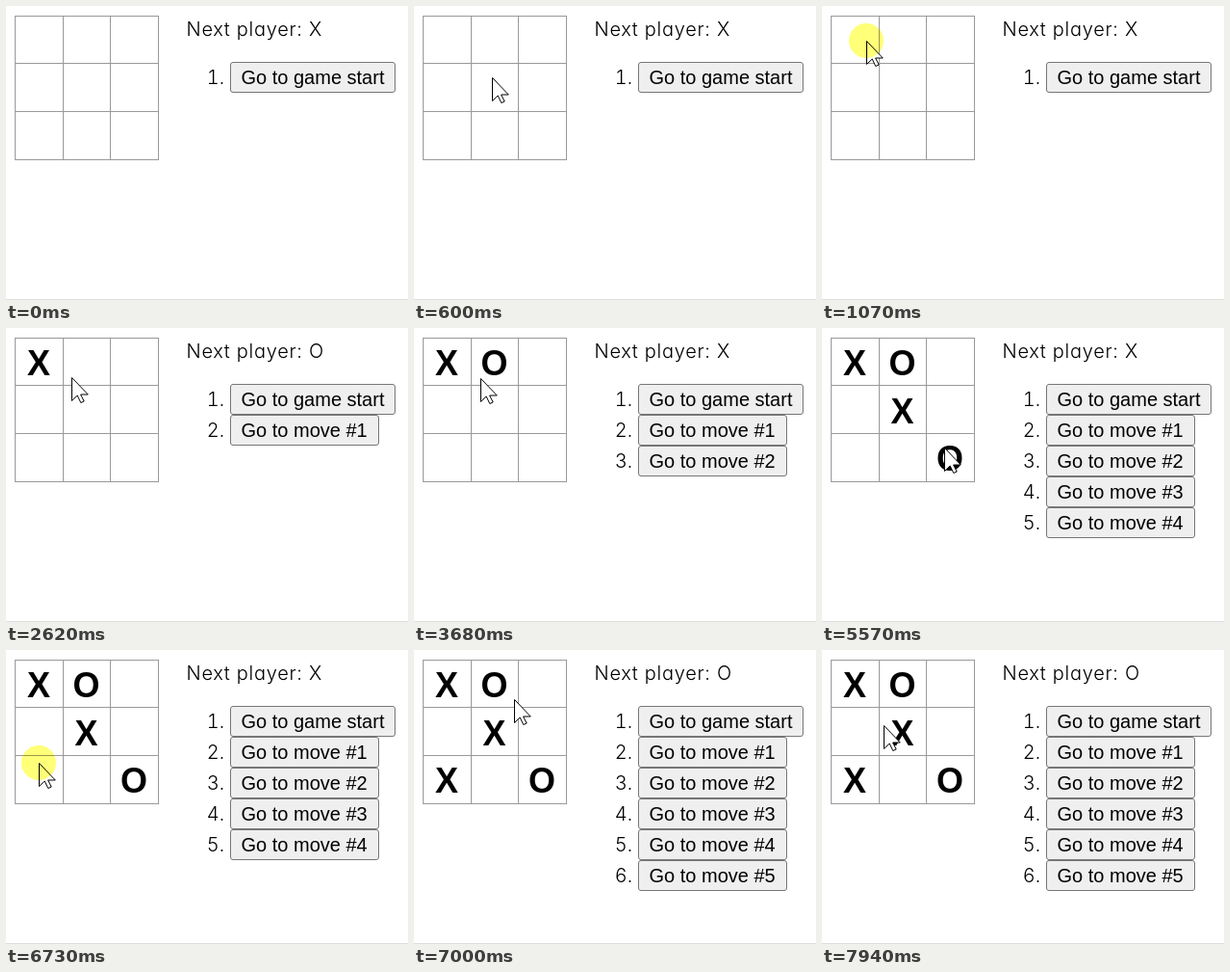
Write an HTML page that moves like this. It is 418x305 px and loops after 8000 ms.

```html
<!DOCTYPE html>
<html lang="en">
<head>
<meta charset="utf-8">
<title>Tic-tac-toe</title>
<style>
html, body { margin: 0; width: 100%; height: 100%; overflow: hidden; background: #fff; }
svg { display: block; width: 418px; height: 305px; }
.label { font: 300 20px Inter, sans-serif; font-feature-settings: "cv11"; letter-spacing: .7px; }
.number { font-feature-settings: "tnum"; letter-spacing: 0; text-anchor: end; }
.button { font: 20px "Liberation Sans", Arial, sans-serif; }
.mark { font: bold 36px "Liberation Sans", Arial, sans-serif; text-anchor: middle; }
#glow { mix-blend-mode: multiply; }
</style>
</head>
<body>
<svg viewBox="0 0 418 305">
  <path d="M0 304.5H418" stroke="#ddd"/>
  <path d="M9 10.5H159M9 59.5H159M9 109.5H159M9 159.5H159M9.5 10V160M59.5 10V160M108.5 10V160M158.5 10V160" stroke="#999" fill="none"/>
  <text id="status" class="label" x="187.5" y="31"></text>
  <g id="list"></g>
  <g id="marks"></g>
  <path id="cursor" d="M.5 .5V24.5L6.2 19L9.8 26.5L13.2 25L9.6 18H17.3Z" fill="#fff" stroke="#000"/>
  <circle id="glow" r="18" fill="#ffff78"/>
</svg>
<script>
const LOOP = 8000, STEP = 70, ENTER = 190, CELL = 49.5;
const NS = "http://www.w3.org/2000/svg";
const $ = id => document.getElementById(id);

// Times at which a mark is placed; the pointer decides the cell
const played = [1140, 2950, 4090, 5570, 6800];

// Pointer stops: departure time, x, y, number of steps
const entry = [324, 339];
const stops = [
  [ENTER, 46, 36, 12],
  [1340, 64, 51],
  [2620, 68, 51],
  [3680, 69, 52],
  [3750, 78, 80, 4],
  [5010, 109, 89],
  [5080, 127, 124, 6],
  [6310, 34, 117, 6],
  [6870, 107, 48, 3],
  [7730, 64, 78, 4]
];

const easeOut = p => 1 - (1 - p) ** 3;

function pointer(t) {
  let [x, y] = entry;
  for (const [start, endX, endY, steps = 1] of stops) {
    if (t < start) break;
    const done = Math.floor((t - start) / STEP) + 1;
    const p = easeOut(Math.min(1, done / steps));
    x += (endX - x) * p;
    y += (endY - y) * p;
  }
  return [Math.round(x), Math.round(y)];
}

function add(parent, tag, attrs, text) {
  const el = document.createElementNS(NS, tag);
  for (const key in attrs) el.setAttribute(key, attrs[key]);
  if (text) el.textContent = text;
  parent.appendChild(el);
  return el;
}

function addRow(i) {
  const y = 58 + 32 * i, row = add($("list"), "g", {});
  add(row, "text", { class: "label number", x: 227, y: y + 23 }, `${i + 1}.`);
  add(row, "rect", {
    x: 233.5, y: y + .5, width: i ? 154 : 171, height: 31, rx: 2.5,
    fill: "#efefef", stroke: "#767676"
  });
  add(row, "text", { class: "button", x: 244.5, y: y + 23 }, i ? `Go to move #${i}` : "Go to game start");
  return row;
}

function addMark(time, i) {
  const [col, row] = pointer(time).map(v => Math.floor((v - 10) / CELL));
  return add($("marks"), "text", { class: "mark", x: 34 + CELL * col, y: 49 + CELL * row }, "XO"[i % 2]);
}

const rows = [0, ...played].map((_, i) => addRow(i));
const marks = played.map(addMark);

const show = (el, on) => el.setAttribute("visibility", on ? "visible" : "hidden");

function draw(t) {
  const count = played.filter(time => t >= time).length;
  $("status").textContent = "Next player: " + "XO"[count % 2];
  rows.forEach((row, i) => show(row, i <= count));
  marks.forEach((mark, i) => show(mark, i < count));
  for (const id of ["cursor", "glow"]) $(id).setAttribute("transform", `translate(${pointer(t)})`);
  show($("cursor"), t >= ENTER);
  show($("glow"), t >= played[count] - STEP);
}

let origin;
function tick(now) {
  origin ??= now;
  draw((now - origin) % LOOP);
  requestAnimationFrame(tick);
}
draw(0);
requestAnimationFrame(tick);
</script>
</body>
</html>
```
